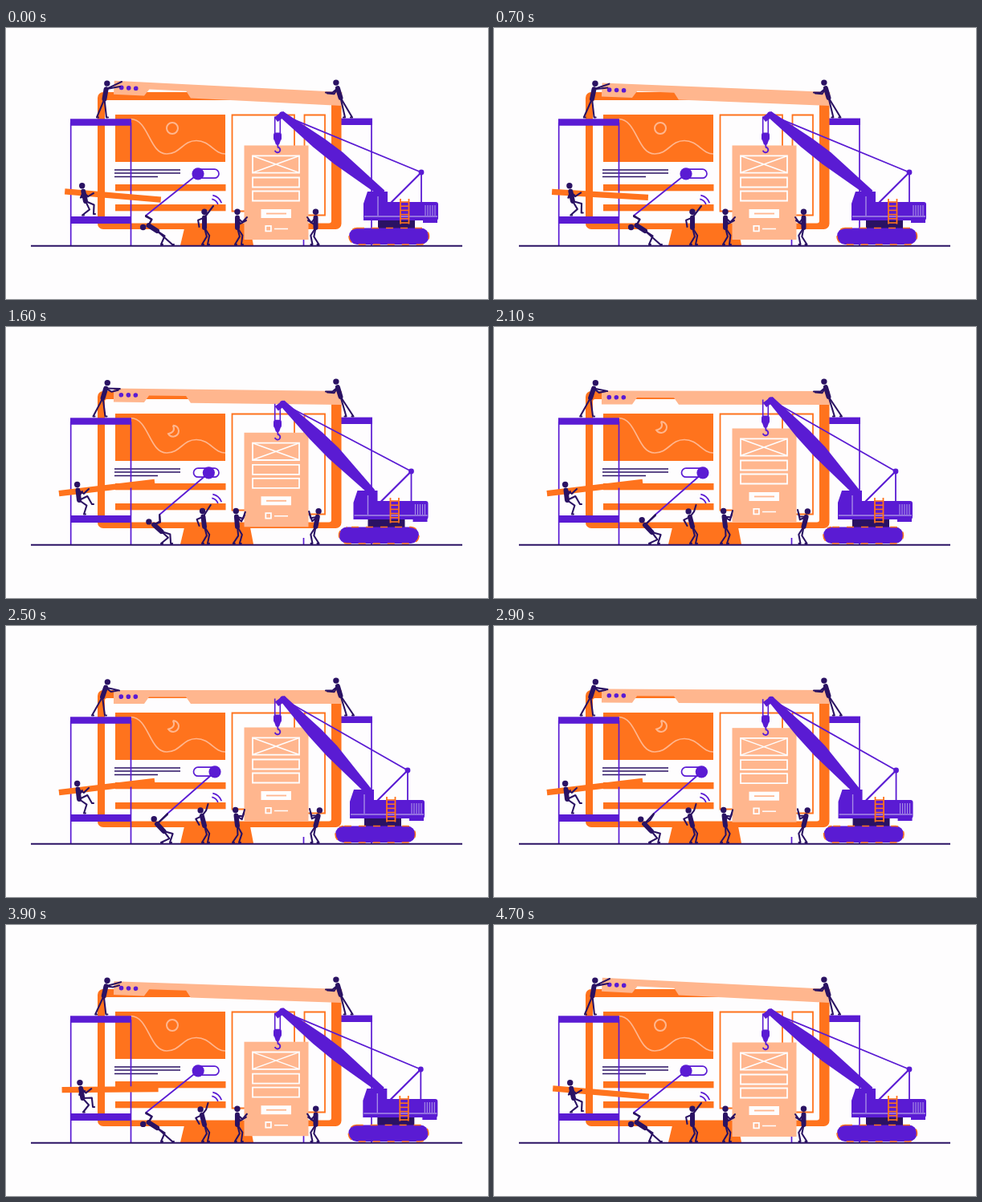
Animation of 600 by 338 pixels, one loop 4800 ms. Source, as an HTML page with a canvas:

```html
<!DOCTYPE html>
<html lang="en">
<head>
<meta charset="utf-8">
<title>Building a web page</title>
<style>
html, body { margin: 0; width: 100%; height: 100%; overflow: hidden; background: #fefdfe; }
canvas { display: block; width: 600px; height: 338px; }
</style>
</head>
<body>
<canvas id="stage"></canvas>
<script>
const WHITE = '#fefdfe', ORANGE = '#ff731d', SALMON = '#ffb68e';
const PURPLE = '#5a1bd3', NAVY = '#2a1263', LILAC = '#a68be6';
const LOOP = 4800, STEP = 100;
const canvas = document.getElementById('stage');
const c = canvas.getContext('2d');
const dpr = window.devicePixelRatio || 1;
canvas.width = 600 * dpr;
canvas.height = 338 * dpr;

const lerp = (a, b, k) => a + (b - a) * k;
const ease = (t, from, to) => {
  const u = Math.min(1, Math.max(0, (t - from) / (to - from)));
  return 0.5 - 0.5 * Math.cos(Math.PI * u);
};

function box(x, y, w, h, color) {
  c.fillStyle = color;
  c.fillRect(x, y, w, h);
}
function stroke(color, width) {
  c.strokeStyle = color;
  c.lineWidth = width;
  c.stroke();
}
function roundPath(x, y, w, h, r) {
  c.beginPath();
  c.roundRect(x, y, w, h, r);
}
function round(x, y, w, h, r, color) {
  roundPath(x, y, w, h, r);
  c.fillStyle = color;
  c.fill();
}
function frame(x, y, w, h, color, width) {
  roundPath(x, y, w, h, 0);
  stroke(color, width);
}
function trace(pts) {
  c.beginPath();
  for (const [x, y] of pts) c.lineTo(x, y);
}
function line(color, width, ...pts) {
  trace(pts);
  stroke(color, width);
}
function poly(color, ...pts) {
  trace(pts);
  c.fillStyle = color;
  c.fill();
}
function dot(x, y, r, color) {
  c.beginPath();
  c.arc(x, y, r, 0, 7);
  c.fillStyle = color;
  c.fill();
}
function shifted(x, y, angle, paint) {
  c.save();
  c.translate(x, y);
  c.rotate(angle);
  paint();
  c.restore();
}

// Elbow or knee of a limb with two equal segments
function joint([ax, ay], [bx, by], size, side) {
  const dx = bx - ax, dy = by - ay, d = Math.hypot(dx, dy);
  const out = side * Math.sqrt(Math.max(0, size * size - d * d / 4)) / d;
  return [(ax + bx) / 2 - dy * out, (ay + by) / 2 + dx * out];
}
const along = ([x, y], angle, size) => [x + Math.sin(angle) * size, y - Math.cos(angle) * size];

function person({ hip, lean, hands, feet, face = 1, nod = 0 }) {
  const neck = along(hip, lean, 12.5);
  for (const hand of hands) line(NAVY, 2.1, neck, joint(neck, hand, 8.5, face), hand);
  for (const foot of feet) {
    line(NAVY, 2.1, hip, joint(hip, foot, 11.5, -face), foot, [foot[0] + 2 * face, foot[1]]);
  }
  line(NAVY, 6, neck, hip);
  dot(...along(neck, lean + nod, 7.2), 3.7, NAVY);
}
const pair = ([x, y], dx, dy) => [[x, y], [x + dx, y + dy]];

function people(lid, beam, pull, lift, greet) {
  person({
    hip: [lerp(122.5, 120, lid), 88.5], lean: lerp(0.17, 0.33, lid),
    hands: pair([lerp(144, 141, lid), lerp(67, 80.5, lid)], -2, lerp(6, 0, lid)),
    feet: pair([lerp(113, 107, lid), 111.5], lerp(12, 16, lid), 0)
  });
  person({
    hip: [416.5, 87], lean: -0.29, face: -1,
    hands: pair([398, 80.5], 2, 1),
    feet: pair([lerp(422, 424, lid), 111.5], 9, 0)
  });
  person({
    hip: [lerp(99, 91, beam), 216], lean: lerp(-0.22, -0.12, beam),
    hands: pair([lerp(109, 103, beam), lerp(206, 202, beam)], -8, 3),
    feet: [[lerp(95, 97, beam), 233.5], [lerp(109, 107, beam), lerp(232, 221, beam)]]
  });
  person({
    hip: [lerp(188, 196.5, pull), lerp(253, 256, pull)],
    lean: lerp(-1, -0.75, pull), nod: lerp(-0.88, 0.2, pull),
    hands: pair(grip(pull), 0, 1),
    feet: pair([193, 270], lerp(14, 11, pull), 0)
  });
  person({
    hip: [247, 249], lean: -0.25 * greet,
    hands: [[lerp(258, 251.5, greet), 222], [240.5, 248]],
    feet: pair([244, 270], 7, 0)
  });
  person({
    hip: [288, 249], lean: -0.12 * lift,
    hands: pair([lerp(300, 297, lift), lerp(236, 229, lift)], -1, 4),
    feet: pair([lerp(285, 282, lift), 270], 8, 0)
  });
  person({
    hip: [385.5, 249], lean: 0.25 * lift, face: -1,
    hands: pair([lerp(375, 378, lift), lerp(236, 228, lift)], 1, 4),
    feet: pair([381.5, 270], 8, 0)
  });
}

function scaffold() {
  for (const x of [80.7, 155.5]) line(PURPLE, 1.7, [x, 118], [x, 271]);
  box(80, 113.3, 76, 8.5, PURPLE);
  box(80, 235, 76, 9, PURPLE);
}

function wave() {
  c.beginPath();
  c.moveTo(155, 113.5);
  c.bezierCurveTo(178, 113.5, 178, 157, 200, 157);
  c.bezierCurveTo(217, 157, 220, 140.5, 237, 140.5);
  c.bezierCurveTo(254, 140.5, 259, 157, 273, 157);
}

function picture(k) {
  box(136, 108, 137, 59, ORANGE);
  wave();
  stroke(SALMON, 1.7);
  c.save();
  c.lineTo(273, 108);
  c.lineTo(155, 108);
  c.clip();
  const y = 125 + 70 * Math.min(k, 1 - k);
  c.beginPath();
  if (k < 0.5) {
    c.arc(207, y, 7, 0, 7);
  } else {
    c.arc(208, y, 7, -1.6, 2.6);
    c.quadraticCurveTo(212, y + 1, 207.8, y - 7);
  }
  stroke(SALMON, 2);
  c.restore();
}

function monitor(sun) {
  poly(ORANGE, [222, 250], [304, 250], [308, 271], [217, 271]);
  round(114, 80, 303.5, 171, 7, ORANGE);
  round(123, 90, 282, 153.5, 3, WHITE);
  picture(sun);
  for (const [y, end] of [[177, 217], [181, 217], [185.5, 189]]) line(NAVY, 1.7, [135, y], [end, y]);
  for (const y of [195, 220]) box(136, y, 137.5, 8.3, ORANGE);
  frame(281.5, 108.5, 77.5, 120, ORANGE, 1.8);
  frame(371.5, 108.5, 25.5, 125, ORANGE, 1.8);
}

function titleBar(k) {
  shifted(417, 90, lerp(0.0505, 0, k), () => {
    c.translate(-417, -90);
    poly(SALMON, [134, 80], [418, 80], [418, 97], [230, 97], [224, 88.5], [178, 88.5], [172, 97], [134, 97]);
    for (let i = 0; i < 3; i++) dot(143.3 + 9 * i, 88.2, 2.8, PURPLE);
  });
}

const grip = k => [lerp(174, 201, k), 234];

function toggle(k) {
  const x = lerp(239, 260, k);
  round(233.5, 176.2, 31.5, 11, 5.5, WHITE);
  stroke(PURPLE, 1.7);
  line(PURPLE, 1.8, [x, 182], grip(k));
  dot(x, 181.8, 7.6, PURPLE);
}

function plank(k) {
  shifted(lerp(133, 125.5, k), lerp(209, 200.5, k), lerp(0.085, -0.12, k), () => {
    box(-60, -3.6, 120, 7.2, ORANGE);
  });
}

function panel(y) {
  shifted(296.5, y, 0, () => {
    box(0, 0, 80, 117.5, SALMON);
    line(WHITE, 1.4, [10.5, 13], [68.5, 34]);
    line(WHITE, 1.4, [68.5, 13], [10.5, 34]);
    frame(10.5, 12.8, 58, 21.4, WHITE, 1.8);
    for (const top of [40, 57]) frame(10.5, top, 58, 12, WHITE, 1.8);
    box(21, 79.5, 37.5, 11, WHITE);
    line(SALMON, 1.8, [27.5, 85], [52.5, 85]);
    frame(26.8, 100.3, 6.6, 6.6, WHITE, 1.8);
    line(WHITE, 1.5, [37.5, 104], [54.5, 104]);
  });
}

function hook(y) {
  shifted(338, y, 0, () => {
    for (const x of [-3.3, 3.3]) line(PURPLE, 1.6, [x, -36], [x, -14]);
    round(-5, -16, 10, 10, 3, PURPLE);
    poly(PURPLE, [-4.5, -8], [4.5, -8], [2, -1], [-2, -1]);
    c.beginPath();
    c.moveTo(0, -2);
    c.arc(0, 5.5, 3.3, -1.4, 2.9);
    stroke(PURPLE, 1.9);
  });
}

function boom([x, y], [bx, by]) {
  const size = Math.hypot(bx - x, by - y);
  shifted(x, y, Math.atan2(by - y, bx - x), () => {
    poly(PURPLE, [-2, -4], [60, -9], [88, -9.5], [size, -4], [size, 5], [88, 8.5], [55, 8], [0, 4]);
  });
  dot(x, y, 4, PURPLE);
  line(PURPLE, 7, [x, y], [x - 8, y + 6]);
}

function hull() {
  line(PURPLE, 1.8, [517, 180], [517, 219]);
  line(PURPLE, 2.2, [517, 180], [479, 218]);
  dot(517, 180, 3.4, PURPLE);
  box(463, 239, 46, 11, NAVY);
  poly(PURPLE, [445, 240], [445, 219], [450, 204], [475, 204], [475, 217], [519, 217], [519, 240]);
  round(500, 217, 38, 23, 3, PURPLE);
  box(519, 239, 18, 4, PURPLE);
  line(LILAC, 1.4, [463, 210], [463, 234]);
  line(LILAC, 1.3, [446, 235], [537, 235]);
  for (let x = 522; x < 536; x += 3) line(LILAC, 1.2, [x, 221], [x, 234]);
  for (const x of [491, 501.5]) line(ORANGE, 1.8, [x, 213], [x, 244.5]);
  for (let y = 217; y < 244; y += 5.2) line(ORANGE, 1.6, [491, y], [501.5, y]);
}

function crane(k, panelY) {
  const dx = -17 * k;
  const tip = [lerp(344, 345, k), lerp(108.3, 91.3, k)];
  line(PURPLE, 1.8, tip, [517 + dx, 180]);
  hook(panelY);
  boom(tip, [469 + dx, 206]);
  shifted(dx, 0, 0, () => {
    hull();
    round(427, 249.5, 99.5, 20.5, 10, PURPLE);
    c.setLineDash([9, 9]);
    c.lineDashOffset = -dx;
    stroke(ORANGE, 1.5);
    c.setLineDash([]);
  });
}

function waveMarks() {
  for (const r of [10.5, 15.2]) {
    c.beginPath();
    c.arc(254, 223.5, r, -1.35, -0.35);
    stroke(PURPLE, 1.8);
  }
}

function draw(t) {
  const m = Math.min(t, LOOP - t);
  const lid = ease(m, 0, 2400);
  const beam = ease(m, 500, 1350);
  const lift = ease(m, 730, 2055);
  const pull = ease(m, 830, 2140);
  const sun = ease(m, 900, 1740);
  const greet = ease(t, 1200, 2000) - ease(t, 3950, 4600);
  const panelY = lerp(146.5, 126.5, lift);

  c.setTransform(dpr, 0, 0, dpr, 0, 0);
  box(0, 0, 600, 338, WHITE);
  c.lineCap = 'butt';
  c.lineJoin = 'miter';
  line(PURPLE, 1.7, [455, 118], [455, 271]);
  box(416, 112.6, 40, 8.4, PURPLE);
  monitor(sun);
  titleBar(lid);
  scaffold();
  line(PURPLE, 1.7, [370.5, 263], [370.5, 271]);
  line(NAVY, 1.9, [31, 271.7], [568, 271.7]);
  panel(panelY);
  toggle(pull);
  crane(lift, panelY);
  plank(beam);
  waveMarks();
  c.lineCap = c.lineJoin = 'round';
  people(lid, beam, pull, lift, greet);
}

const start = performance.now();
function tick() {
  const t = (performance.now() - start) % LOOP;
  draw(Math.floor(t / STEP) * STEP);
  requestAnimationFrame(tick);
}
tick();
</script>
</body>
</html>
```
